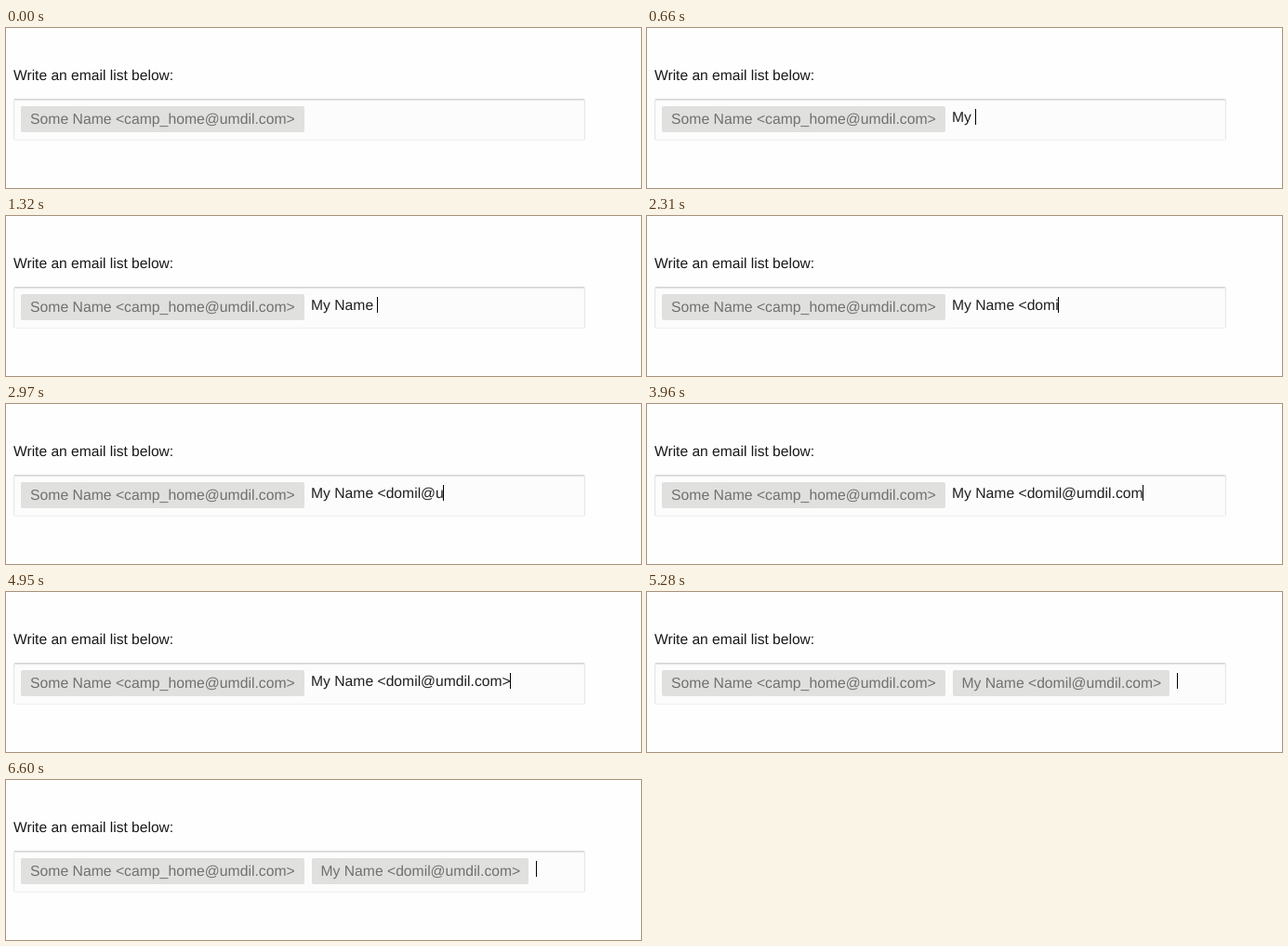
An HTML page that plays this animation: 683 by 172 pixels, repeating every 6.93 s.

```html
<!DOCTYPE html>
<html lang="en">
<head>
<meta charset="utf-8">
<title>Email list</title>
<style>
  html, body { margin: 0; width: 100%; height: 100%; overflow: hidden; background: #fefefe; }
  body { position: relative; font: 15.7px/17px "Liberation Sans", Arial, sans-serif;
         text-rendering: geometricPrecision; white-space: pre; }
  div { position: absolute; box-sizing: border-box; white-space: pre; }
  #label { left: 8px; top: 43px; font-size: 15.6px; color: #181818; }
  #field { left: 8px; top: 76px; width: 615px; height: 45px; background: #fcfcfc;
           border: 1px solid #e6e6e6; border-top-color: #d4d4d4; border-bottom-color: #f0f0f0;
           border-radius: 2px; box-shadow: inset 0 1px 1px #e2e2e2; }
  .chip { top: 84px; height: 28px; padding: 6px 0 0 10px; border-radius: 2px;
          background: #e0e0de; color: #707070; }
  #first { left: 16px; width: 304.5px; font-size: 15.75px; }
  #second { left: 328.5px; width: 233.5px; }
  #typed { left: 328px; top: 88px; color: #202020; }
  #caret { top: 87px; width: 1px; height: 17px; background: #000; }
</style>
</head>
<body>
<div id="label">Write an email list below:</div>
<div id="field"></div>
<div id="first" class="chip">Some Name &lt;camp_home@umdil.com&gt;</div>
<div id="second" class="chip"></div>
<div id="typed"></div>
<div id="caret"></div>
<script>
  const TICK = 330, TICKS = 21;
  const ENTRY = "My Name <domil@umdil.com>";
  // characters typed by the end of each tick, until the entry becomes a chip
  const COUNTS = [0, 1, 3, 5, 8, 8, 9, 13, 14, 16, 19, 21, 24, 24, 24, 25];
  const HIDDEN = [0, 14, 18, 19];
  const INPUT_X = 328, CHIP_CARET_X = 570;

  const [second, typed, caret] = ["second", "typed", "caret"].map(id => document.getElementById(id));
  second.textContent = ENTRY;
  const show = (el, on) => { el.style.visibility = on ? "visible" : "hidden"; };

  let last = -1;
  function draw(now) {
    const tick = Math.floor(now / TICK) % TICKS;
    if (tick !== last) {
      last = tick;
      const done = tick >= COUNTS.length;
      typed.textContent = done ? "" : ENTRY.slice(0, COUNTS[tick]);
      const end = INPUT_X + typed.getBoundingClientRect().width;
      caret.style.left = (done ? CHIP_CARET_X : Math.floor(end)) + "px";
      show(second, done);
      show(caret, !HIDDEN.includes(tick));
    }
    requestAnimationFrame(frame);
  }

  let start = null;
  function frame(now) {
    if (start === null) start = now;
    draw(now - start);
  }
  draw(0);
</script>
</body>
</html>
```
